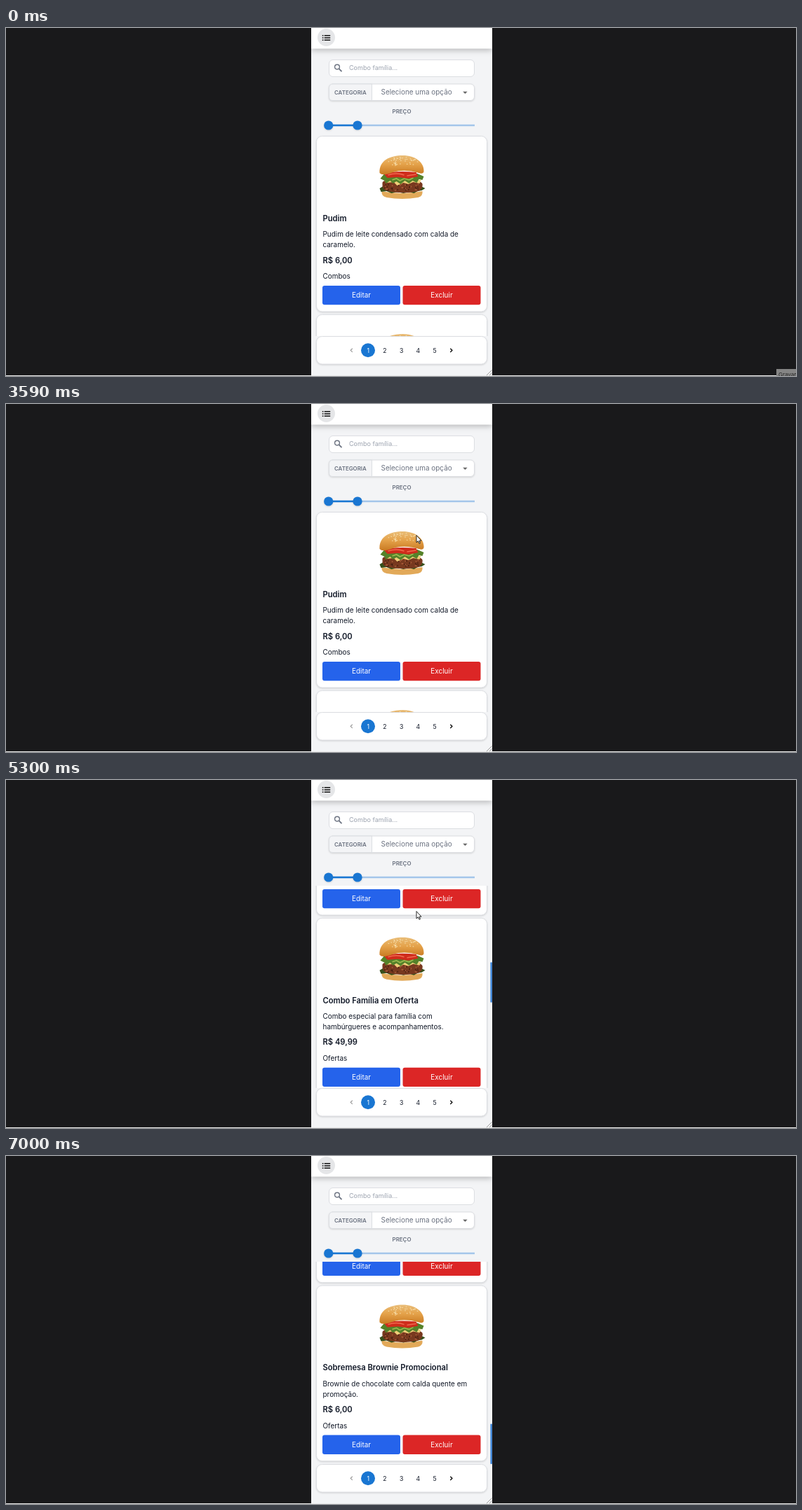
Recreate the animation shown at these times as an HTML page. Size 1126 by 497 pixels, loop 7.06 s.

```html
<!DOCTYPE html>
<html lang="pt-BR">
<head>
<meta charset="utf-8">
<title>Cardápio</title>
<style>
  html, body { margin: 0; width: 100%; height: 100%; overflow: hidden; background: #19191b; }
  svg { display: block; font-family: Inter, Arial, sans-serif; font-size: 9.95px; fill: #111827; }
  .box { fill: #fff; stroke: #dcdee2; }
  .title { font-size: 11.2px; font-weight: 600; }
  .label { font-size: 7.9px; font-weight: 600; fill: #6b7280; }
  .menu { font-size: 9px; fill: #6b7280; }
  .page { font-size: 8.7px; }
  .mid { text-anchor: middle; }
  .white { fill: #fff; }
  .soft { filter: drop-shadow(0 1px 1px #0002); }
  .line { fill: none; stroke: #111; stroke-width: 1.4; }
</style>
</head>
<body>
<svg width="1126" height="497" viewBox="0 0 1126 497">
  <defs>
    <clipPath id="list"><rect x="435" y="151" width="255" height="289"/></clipPath>
    <clipPath id="drawer"><rect id="drawerClip" x="435" width="258"/></clipPath>
    <clipPath id="phone"><rect x="435" width="258" height="496"/></clipPath>
    <linearGradient id="bun" x2="0" y2="1">
      <stop stop-color="#e9bd78"/><stop offset=".45" stop-color="#e5a34b"/><stop offset="1" stop-color="#c97a22"/>
    </linearGradient>
    <g id="burger">
      <path d="M-29 52Q0 58 29 52Q30 59 23 61Q0 65-22 61Q-30 59-29 52Z" fill="#e2a959"/>
      <path d="M-32 48l5-3 54 0 6 3-5 3-6 1-5 3-7-2-8 2-9-2-8 2-7-3-8 1Z" fill="#37501c"/>
      <path d="M-28 42Q-29 37-22 37L22 38Q31 39 29 45Q28 52 18 53Q0 56-20 52Q-29 50-28 42Z" fill="#78391f"/>
      <g id="crumbs"></g>
      <path d="M-24 35L27 36 25 41 16 39 9 42 2 40-7 44-12 39-21 40Z" fill="#f1cf79"/>
      <path d="M-31 34l5-6 48-1 9 4-2 5-5-1-3 5-6-3-5 4-6-4-6 5-6-4-5 3-4-4-6 4-2-4Z" fill="#55822a"/>
      <path d="M-14 36l6-2 5 3 6-3 7 2 6-3" fill="none" stroke="#9cbd50" stroke-width="1.6"/>
      <path d="M-26 27Q-8 22 20 25L23 31 9 34-6 32-21 33Z" fill="#cf2c1c"/>
      <path d="M-20 29Q-8 25 3 29M7 30l13-2" fill="none" stroke="#ef6a4e" stroke-width="1.5"/>
      <path d="M-32 26C-33 8-17 1 1 1C19 1 32 11 31 24Q30 28 24 26Q4 20-13 25Q-28 31-32 26Z" fill="url(#bun)"/>
      <g id="seeds"></g>
    </g>
  </defs>

  <rect width="1126" height="497" fill="#19191b"/>
  <rect y="496" width="1126" height="1" fill="#ececec"/>
  <rect x="435" width="258" height="496" fill="#f3f4f6"/>

  <g clip-path="url(#list)"><g id="cards"></g></g>
  <rect id="thumb" x="690.5" width="2.3" height="57.5" rx="1" fill="#2f7bd3"/>

  <!-- filters -->
  <rect class="box" x="460.5" y="45.5" width="207" height="24" rx="5.5"/>
  <circle cx="472" cy="55.6" r="3.4" class="line" style="stroke:#6b7280"/>
  <path d="M474.5 58.2l4 4" class="line" style="stroke:#6b7280;stroke-width:1.7"/>
  <text x="489" y="60.4" font-size="9.05" fill="#9ca3af">Combo família...</text>
  <g class="soft">
    <rect class="box" x="460.5" y="80" width="207" height="23.5" rx="5.5"/>
    <path d="M521.5 80H466q-5.500 0-5.500 5.500v12.500q0 5.500 5.500 5.500h55.500Z" fill="#f3f4f6" stroke="#dcdee2"/>
  </g>
  <text class="label" x="468" y="94.500">CATEGORIA</text>
  <text x="534.5" y="95.3" fill="#6b7280">Selecione uma opção</text>
  <path d="M651.2 90.700h6.400l-3.200 3.200Z" fill="#666"/>
  <text class="label mid" x="564" y="122.300">PREÇO</text>
  <path d="M460 139H668" stroke="#a3c5ea" stroke-width="2.4"/>
  <path d="M460 139H501" stroke="#1976d2" stroke-width="2.4"/>
  <g class="soft" fill="#1976d2"><circle cx="459.700" cy="139" r="6.600"/><circle cx="501" cy="139" r="6.600"/></g>

  <!-- pagination -->
  <rect class="box soft" x="442.500" y="440.500" width="243" height="39.500" rx="8"/>
  <circle cx="516" cy="460.300" r="10" fill="#1976d2"/>
  <g id="pages" class="page mid"></g>
  <path class="line" style="stroke:#999;stroke-width:1.200" d="M493.800 457.700l-2.600 2.600 2.600 2.600"/>
  <path class="line" d="M633.300 457.700l2.600 2.600-2.600 2.600"/>
  <path d="M685 496l7.500-7.500M689 496l3.500-3.500" stroke="#888" stroke-width=".8"/>

  <!-- top bar and drawer -->
  <g clip-path="url(#phone)">
    <rect id="bar" x="435" width="258" fill="#fff" style="filter:drop-shadow(0 2px 4px #0004)"/>
  </g>
  <circle cx="456.500" cy="13.500" r="12.500" fill="#e5e6e8"/>
  <path d="M450.800 10.700h1.600M450.800 14h1.600M450.800 17.300h1.600M453.700 10.700h8.500M453.700 14h8.500M453.700 17.300h8.500" class="line"/>
  <g class="menu" clip-path="url(#drawer)">
    <g id="plus">
      <circle cx="457.500" cy="46" r="6.200"/>
      <path d="M454.300 46h6.400M457.500 42.800v6.400" stroke="#fff" stroke-width="1.400"/>
    </g>
    <use href="#plus" y="67.300"/>
    <path d="M453.200 74.700h2.200l.8-.9h2.700l.8.900h2.100v1.300h-8.600ZM453.800 76.700h7.500v7q0 1.300-1.300 1.300h-4.900q-1.300 0-1.300-1.300Z"/>
    <text x="471.500" y="49.500">Nova categoria</text>
    <text x="471.500" y="83">Excluir categoria</text>
    <text x="471.500" y="116.500">Novo item</text>
    <rect x="450" y="140" width="25" height="13" rx="6.500" fill="#ccc"/>
    <circle class="white" cx="456.500" cy="146.500" r="5.500"/>
    <text x="481.500" y="149.800">Modo claro</text>
  </g>

  <g id="record">
    <rect x="1098" y="487" width="28" height="10" fill="#858585"/>
    <text x="1101" y="498" font-size="8" fill="#222">Gravar</text>
  </g>
  <path id="arrow" d="M0 0V10.300L2.400 8.200 4 11.800 5.500 11.100 4 7.700H7Z" fill="#fff" stroke="#111" stroke-width=".9"/>
  <path id="hand" d="M-1 8V1Q0-.5 1 1V5Q2.200 4 3 5.300Q4.300 4.500 5 6Q6.300 5.500 6.200 7V10Q6 12 5 13.500H0Q-1.500 11-3.700 8.500Q-4 6.800-2.500 7Z" fill="#fff" stroke="#111" stroke-width=".9"/>
</svg>
<script>
const $ = id => document.getElementById(id);
const LOOP = 7060;

let seed = 7;
const rnd = () => (seed = seed * 16807 % 2147483647) / 2147483647;
const dots = (n, dot) => Array.from({ length: n }, dot).join('');
$('seeds').innerHTML = dots(42, () => {
  const a = rnd() * 6.283, r = Math.sqrt(rnd());
  return `<ellipse cx="${r * Math.cos(a) * 23}" cy="${10 + r * Math.sin(a) * 7}" rx=".9" ry=".5" fill="#fae5b6"/>`;
});
$('crumbs').innerHTML = dots(45, () =>
  `<circle cx="${rnd() * 50 - 25}" cy="${42 + rnd() * 9}" r="1" fill="${rnd() < .5 ? '#4b2113' : '#a65a38'}"/>`);

const items = [
  ['Pudim', 'Pudim de leite condensado com calda de', 'caramelo.', '6,00', 'Combos'],
  ['Oferta de Hambúrguer Clássico', 'Aproveite o hambúrguer clássico com um', 'desconto especial.', '14,99', 'Ofertas'],
  ['Combo Família em Oferta', 'Combo especial para família com', 'hambúrgueres e acompanhamentos.', '49,99', 'Ofertas'],
  ['Oferta de Batata Frita', 'Porção de batata frita crocante com', 'desconto especial.', '9,99', 'Ofertas'],
  ['Sobremesa Brownie Promocional', 'Brownie de chocolate com calda quente em', 'promoção.', '6,00', 'Ofertas']
];
const button = (x, color, label) =>
  `<rect x="${x}" y="368" width="111" height="27.300" rx="3" fill="${color}"/>
   <text class="mid white" x="${x + 55.5}" y="385.200">${label}</text>`;
$('cards').innerHTML = items.map(([title, line1, line2, price, kind], i) => `
  <g transform="translate(0 ${i * 254.9})">
    <rect class="box soft" x="442.500" y="154.500" width="243" height="250.500" rx="8"/>
    <use href="#burger" x="564.500" y="181"/>
    <text class="title" x="451.500" y="275.800">${title}</text>
    <text x="451.500" y="298.300">${line1}</text>
    <text x="451.500" y="313.200">${line2}</text>
    <text class="title" x="451.500" y="335.500">R$ ${price}</text>
    <text x="451.500" y="358">${kind}</text>
    ${button(451, '#2563eb', 'Editar')}${button(565.5, '#dc2626', 'Excluir')}
  </g>`).join('');
$('pages').innerHTML = [1, 2, 3, 4, 5].map(n =>
  `<text x="${492.4 + n * 23.75}" y="463.500"${n === 1 ? ' class="white"' : ''}>${n}</text>`).join('');

const smooth = p => p * p * (3 - 2 * p);
// Keys are [time, ...values]; each span is eased.
function track(keys, t) {
  const i = keys.findIndex(k => k[0] > t);
  if (i === 0) return keys[0].slice(1);
  if (i < 0) return keys.at(-1).slice(1);
  const a = keys[i - 1], b = keys[i];
  const p = smooth((t - a[0]) / (b[0] - a[0]));
  return a.slice(1).map((v, j) => v + (b[j + 1] - v) * p);
}

const pointer = [[70, 1092, 472], [760, 469, 15], [830, 460, 12], [900, 457, 12],
  [3180, 457, 12], [3590, 585, 187.5], [6280, 585, 187.5], [6560, 1070, 475]];
const drawer = [[1200, 29.5], [1780, 191], [2950, 191], [3500, 29.5]];
const scroll = [[3900, 0], [4130, 156], [4399, 156], [4400, 181], [4470, 215], [4540, 234],
  [4740, 234], [5300, 467], [5410, 467], [5570, 623], [6080, 623], [6240, 976.5], [6310, 989]];

function draw(t) {
  const [x, y] = track(pointer, t), [h] = track(drawer, t), [s] = track(scroll, t);
  const visible = t >= 70 && t < 6600;
  const onButton = Math.hypot(x - 456.5, y - 13.5) < 12;
  $('arrow').style.display = visible && !onButton ? '' : 'none';
  $('hand').style.display = visible && onButton ? '' : 'none';
  for (const id of ['arrow', 'hand']) $(id).setAttribute('transform', `translate(${x} ${y})`);
  $('record').style.display = t < 70 ? '' : 'none';
  $('bar').setAttribute('height', h);
  $('drawerClip').setAttribute('height', h > 30 ? h : 0);
  $('cards').setAttribute('transform', `translate(0 ${-s})`);
  $('thumb').setAttribute('y', 151 + s * .234);
  $('thumb').style.display = t >= 3920 ? '' : 'none';
}

const start = performance.now();
function loop() {
  draw((performance.now() - start) % LOOP);
  requestAnimationFrame(loop);
}
loop();
</script>
</body>
</html>
```
